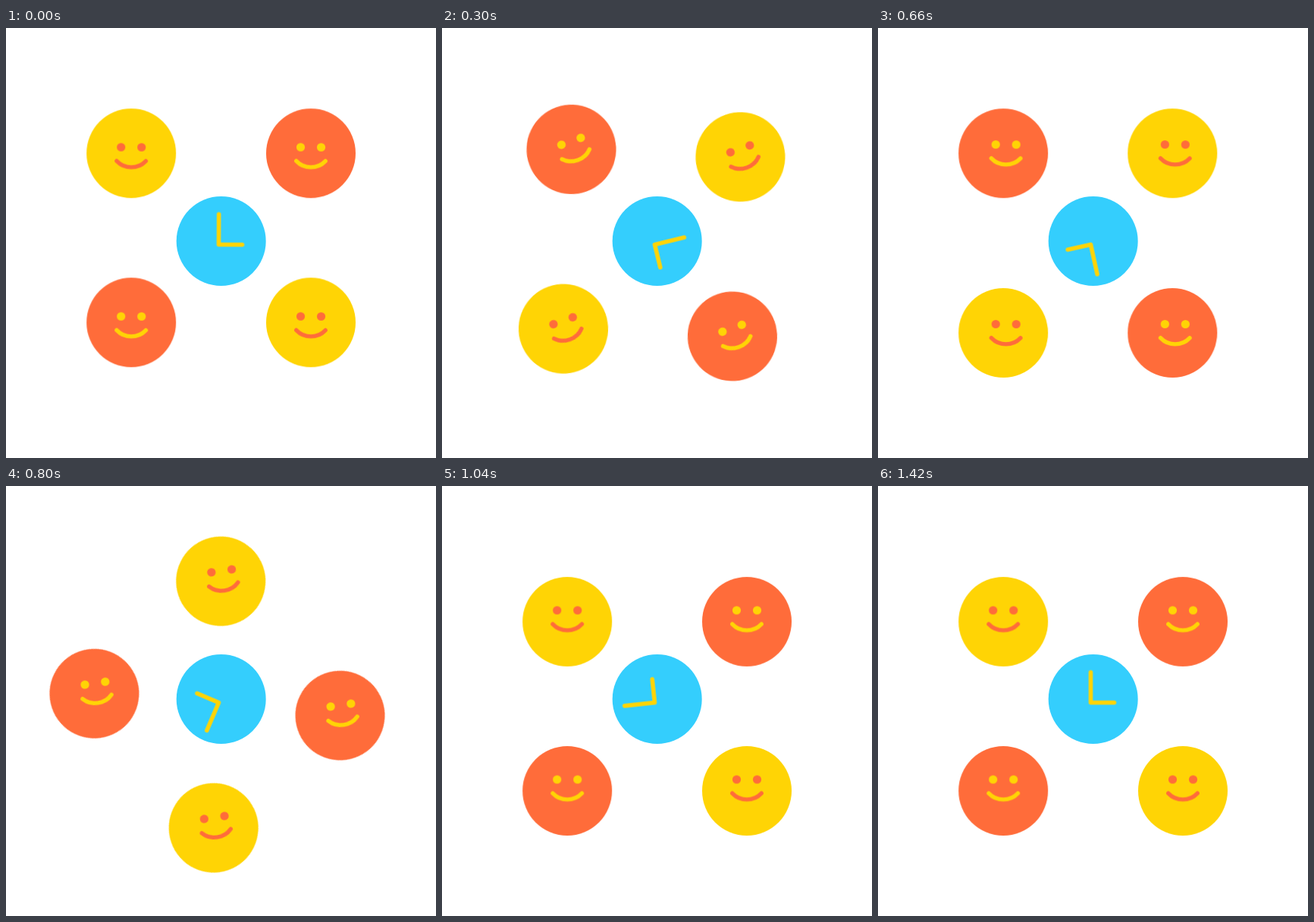
Write an HTML page that moves like this. It is 567x567 px and loops after 2.1 s.

```html
<!DOCTYPE html>
<html lang="en">
<head>
<meta charset="utf-8">
<title>Faces around a clock</title>
<style>
  html, body { margin: 0; width: 100%; height: 100%; overflow: hidden; background: #fff; }
  svg { display: block; width: 100vw; height: 100vh; }
  .ring, .face, .hands { animation: 2100ms linear infinite; }
  .ring { animation-name: orbit; }
  .face { animation-name: level; }
  .hands { animation-name: tick; }

  /* two eased quarter turns: 0-360 ms and 660-1007 ms */
  @keyframes orbit {
    0% { transform: rotate(0deg); animation-timing-function: cubic-bezier(.4, 0, .4, 1); }
    17.143% { transform: rotate(-90deg); }
    31.429% { transform: rotate(-90deg); animation-timing-function: cubic-bezier(.4, 0, .4, 1); }
    47.952%, 100% { transform: rotate(-180deg); }
  }
  /* faces straighten up at constant speed: 0-400 ms and 660-1040 ms */
  @keyframes level {
    0% { transform: rotate(0deg); }
    19.048%, 31.429% { transform: rotate(90deg); }
    49.524%, 100% { transform: rotate(180deg); }
  }
  /* one full turn in 1420 ms */
  @keyframes tick {
    0% { transform: rotate(0deg); }
    67.619%, 100% { transform: rotate(360deg); }
  }
</style>
</head>
<body>
<svg viewBox="0 0 567 567">
  <g transform="translate(283.6 283.6)"><g class="ring" id="ring"></g></g>
  <circle cx="283.7" cy="281" r="59" fill="#34cefd"/>
  <g transform="translate(280.5 285.6)">
    <path class="hands" d="M0-40V0H31" fill="none" stroke="#ffd405" stroke-width="5.5"
      stroke-linecap="round" stroke-linejoin="round"/>
  </g>
</svg>
<script>
  const yellow = '#ffd405', orange = '#ff6c3a';

  const smiley = (x, y, skin, ink) => `
    <g transform="translate(${x} ${y})">
      <circle r="59" fill="${skin}"/>
      <g transform="translate(0 3.5)">
        <g class="face" fill="${ink}">
          <circle cx="-13.5" cy="-11.5" r="5.6"/>
          <circle cx="13.5" cy="-11.5" r="5.6"/>
          <path d="M-19.3 6.6A26.5 26.5 0 0 0 19.3 6.6" fill="none"
            stroke="${ink}" stroke-width="5.3" stroke-linecap="round"/>
        </g>
      </g>
    </g>`;

  document.getElementById('ring').innerHTML =
    smiley(-118.4, -118.4, yellow, orange) +
    smiley(118.4, -118.4, orange, yellow) +
    smiley(-118.4, 104.7, orange, yellow) +
    smiley(118.4, 104.7, yellow, orange);
</script>
</body>
</html>
```
